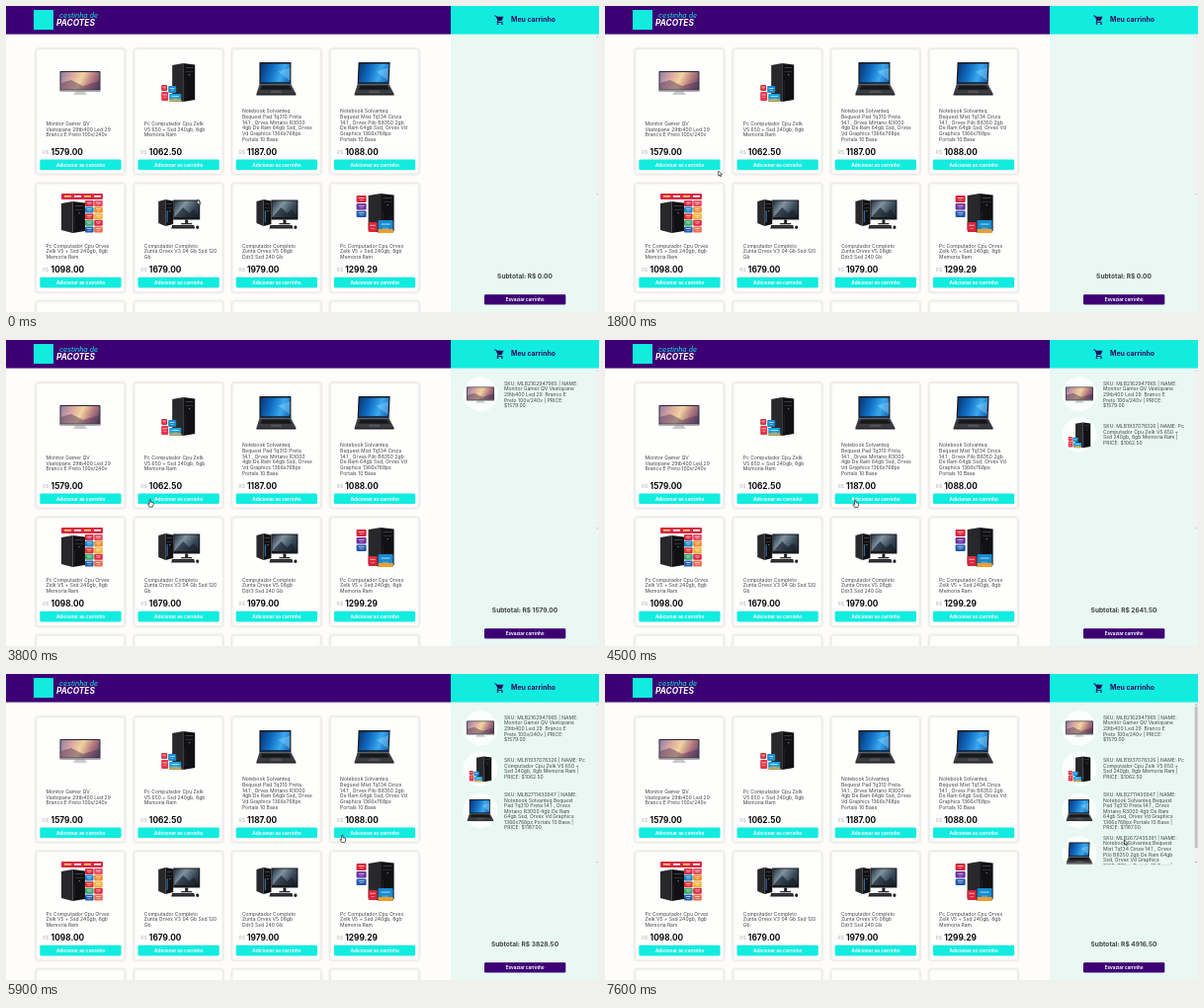
Recreate the animation shown at these times as an HTML page with a canvas. Size 600 by 310 pixels, loop 8000 ms.

```html
<!DOCTYPE html>
<html lang="pt-BR">
<head>
<meta charset="utf-8">
<title>Loja</title>
<style>
html, body { margin: 0; width: 100%; height: 100%; overflow: hidden; background: #fefdfc; }
canvas { display: block; width: 600px; height: 310px; }
</style>
</head>
<body>
<canvas id="stage"></canvas>
<script>
const W = 600, H = 310, LOOP = 8000, STEP = 100;
const PURPLE = '#3c0074', CYAN = '#12ecdf', MINT = '#e9f8f3', PAGE = '#fefdfb', INK = '#444446';
const canvas = document.getElementById('stage');
const ctx = canvas.getContext('2d');
const ratio = window.devicePixelRatio || 1;
canvas.width = W * ratio;
canvas.height = H * ratio;

function rect(x, y, w, h, fill) {
  ctx.fillStyle = fill;
  ctx.fillRect(x, y, w, h);
}

function round(x, y, w, h, r, fill, stroke) {
  ctx.beginPath();
  ctx.roundRect(x, y, w, h, r);
  ctx.fillStyle = fill;
  ctx.fill();
  if (stroke) {
    ctx.strokeStyle = stroke;
    ctx.lineWidth = 0.8;
    ctx.stroke();
  }
}

function poly(points, fill, stroke) {
  ctx.beginPath();
  points.forEach(([x, y]) => ctx.lineTo(x, y));
  ctx.closePath();
  ctx.fillStyle = fill;
  ctx.fill();
  if (stroke) {
    ctx.strokeStyle = stroke;
    ctx.lineWidth = 0.7;
    ctx.stroke();
  }
}

function disc(x, y, r, fill) {
  ctx.beginPath();
  ctx.arc(x, y, r, 0, Math.PI * 2);
  ctx.fillStyle = fill;
  ctx.fill();
}

// Set ten times larger, then scaled down, to keep small type free of rounding.
function text(str, x, y, size, color, weight = 400, align = 'left', style = 'normal') {
  ctx.save();
  ctx.translate(x, y);
  ctx.scale(0.1, 0.1);
  ctx.font = `${style} ${weight} ${size * 10}px Inter, "Open Sans", sans-serif`;
  ctx.textAlign = align;
  ctx.fillStyle = color;
  ctx.fillText(str, 0, 0);
  ctx.restore();
}

function lines(rows, x, y, pitch) {
  rows.forEach((row, i) => text(row, x, y + i * pitch, 5.05, INK));
}

function blend(x0, y0, x1, y1, colors) {
  const g = ctx.createLinearGradient(x0, y0, x1, y1);
  colors.forEach((c, i) => g.addColorStop(i / (colors.length - 1), c));
  return g;
}

// Product pictures, each around its own centre.
function monitor() {
  poly([[-4, 9], [4, 9], [7, 13], [-7, 13]], '#c9cacc');
  round(-20.5, -11, 41, 20.5, 0.8, '#2a2a30');
  rect(-19.5, -10, 39, 17.5, blend(-19, -10, 19, 8, ['#8d7fa8', '#d9a4a0', '#f0d3a0', '#b3757e', '#54456c']));
  poly([[-19.5, 7.5], [-19.5, 1], [-9, -2], [3, 4], [19.5, -1], [19.5, 7.5]], 'rgba(72,48,84,.45)');
  rect(-20, 8.4, 40, 1, '#d8d8da');
}

function tower(x, y, w, h) {
  poly([[x, y + 2], [x + w * 0.48, y], [x + w * 0.48, y + h], [x, y + h - 3]], '#28282b');
  poly([[x + w * 0.48, y], [x + w, y + 1.5], [x + w, y + h - 2], [x + w * 0.48, y + h]], '#111114');
  rect(x + w * 0.58, y + 4, w * 0.34, 1, '#3e3e43');
  rect(x + w * 0.58, y + 8, w * 0.34, 0.8, '#36363b');
  rect(x + w * 0.73, y + 11, 1.2, 1.2, '#777');
  rect(x + w * 0.55, y + h * 0.45, 0.5, h * 0.45, '#333338');
}

function badge(x, y, w, h, fill) {
  round(x, y, w, h, 1, fill);
  rect(x + w * 0.2, y + h * 0.28, w * 0.6, 0.8, 'rgba(255,255,255,.85)');
  rect(x + w * 0.3, y + h * 0.6, w * 0.4, 0.6, 'rgba(255,255,255,.65)');
}

function towerLow() {
  tower(-6, -19, 23, 39);
  badge(-17, 3, 6, 6, '#cf2f3c');
  badge(-17, 10, 7, 9, '#e5364a');
  badge(-10, 4, 8, 7, '#1689cf');
  badge(-9, 12, 12, 8, '#17a0dc');
  rect(-9, 17.5, 12, 2, '#f2a32e');
}

function laptop(tilt) {
  poly([[-17 + tilt, -17.5], [15 + tilt, -17.5], [15, 5], [-17, 5]], '#17181b');
  poly([[-15.7 + tilt, -16], [13.8 + tilt, -16], [13.8, 3.8], [-15.7, 3.8]],
    blend(-15, -10, 15, 0, ['#0a3f86', '#126fc4', '#3aa9ee', '#1161b4']));
  poly([[2, -8], [14, -12], [14, 1]], 'rgba(170,225,255,.35)');
  rect(-15.5, 2.6, 29, 1.2, '#102a4c');
  poly([[-17, 5], [15, 5], [20, 14.5], [-20, 14.5]], '#3a3b3f');
  poly([[-14, 6.2], [13, 6.2], [15.5, 10.2], [-16, 10.2]], '#17181b');
  poly([[-5, 11], [5, 11], [6, 13.7], [-6, 13.7]], '#505157');
  rect(-20, 14.5, 40, 1.5, '#222327');
}

function towerPromo() {
  tower(-19, -12, 24, 32);
  round(-19, -20, 42, 6, 1, '#d92843');
  for (let i = 0; i < 4; i++) rect(-16 + i * 10, -18, 7, 1.6, i % 2 ? '#fff' : '#ffd36a');
  const tints = ['#d92843', '#e24b5d', '#1686c9', '#ef8b2d', '#e32f2f', '#f0b43c', '#38a56b', '#d92843', '#235dac', '#ee6b4d'];
  tints.forEach((c, i) => badge(5 + (i % 2) * 9.2, -13 + Math.floor(i / 2) * 6.6, 8.6, 6, c));
}

function desktop() {
  tower(-20, -14, 15, 27);
  rect(-11.5, -3, 1, 12, '#2a74b8');
  rect(-5, -13.5, 27, 20, '#17181c');
  rect(-4, -12.5, 25, 16.5, blend(-4, -12, 21, 5, ['#26323e', '#8093a1', '#3b4a58', '#15202c']));
  poly([[-4, 4], [5, -6], [11, 0], [16, -4], [21, 4]], 'rgba(20,30,40,.65)');
  rect(7, 6.5, 3, 4, '#222');
  rect(3, 10, 11, 1.3, '#292a2d');
  poly([[-6, 12], [16, 12], [17, 15.5], [-7, 15.5]], '#222327');
  rect(-5, 13.2, 20, 0.6, '#505157');
  round(18, 12.5, 3, 3.5, 1.4, '#202124');
}

function towerSide() {
  tower(-6, -20, 26, 40);
  badge(-18, -18, 10, 7, '#d9253a');
  badge(-18, -10, 10, 6.5, '#6a2f9c');
  badge(-18, -2.5, 10, 6.5, '#2258ae');
  badge(4, 7, 15, 13, '#168bd0');
  rect(4, 16, 15, 4, '#ef9d2d');
  badge(-6, 9, 9, 10, '#d9253a');
}

const products = [
  { art: monitor, price: 1579, rows: ['Monitor Gamer QV', 'Vastopane 29tb400 Led 29', 'Branco E Preto 100v/240v'] },
  { art: towerLow, price: 1062.5, rows: ['Pc Computador Cpu Zelk', 'V5 650 + Ssd 240gb, 8gb', 'Memoria Ram'] },
  { art: () => laptop(0), price: 1187, rows: ['Notebook Solvanteq', 'Bequest Pad Tq310 Preta', '14.1 , Orvex Mirtano R3000', '4gb De Ram 64gb Ssd, Orvex', 'Vd Graphics 1366x768px', 'Portals 10 Base'] },
  { art: () => laptop(1), price: 1088, rows: ['Notebook Solvanteq', 'Bequest Mist Tq134 Cinza', '14.1 , Orvex Pilo B8350 2gb', 'De Ram 64gb Ssd, Orvex Vd', 'Graphics 1366x768px', 'Portals 10 Base'] },
  { art: towerPromo, price: 1098, rows: ['Pc Computador Cpu Orvex', 'Zelk V5 + Ssd 240gb, 8gb', 'Memoria Ram'] },
  { art: desktop, price: 1679, rows: ['Computador Completo', 'Zunta Orvex V3 04 Gb Ssd 120', 'Gb'] },
  { art: desktop, price: 1979, rows: ['Computador Completo', 'Zunta Orvex V5 08gb', 'Ddr3 Ssd 240 Gb'] },
  { art: towerSide, price: 1299.29, rows: ['Pc Computador Cpu Orvex', 'Zelk V5 + Ssd 240gb, 8gb', 'Memoria Ram'] }
];

const cart = [
  { at: 3000, y: 55, top: 45.8, rows: ['SKU: MLB2162947965 | NAME:', 'Monitor Gamer QV Vastopane', '29tb400 Led 29  Branco E', 'Preto 100v/240v | PRICE:', '$1579.00'] },
  { at: 3900, y: 96, top: 89, rows: ['SKU: MLB1937078326 | NAME: Pc', 'Computador Cpu Zelk V5 650 +', 'Ssd 240gb, 8gb Memoria Ram |', 'PRICE: $1062.50'] },
  { at: 5200, y: 138.5, top: 124, rows: ['SKU: MLB2711430947 | NAME:', 'Notebook Solvanteq Bequest', 'Pad Tq310 Preta 14.1 , Orvex', 'Mirtano R3000 4gb De Ram', '64gb Ssd, Orvex Vd Graphics', '1366x768px Portals 10 Base |', 'PRICE: $1187.00'] },
  { at: 6500, y: 182, top: 167.8, rows: ['SKU: MLB2672435391 | NAME:', 'Notebook Solvanteq Bequest', 'Mist Tq134 Cinza 14.1 , Orvex', 'Pilo B8350 2gb De Ram 64gb', 'Ssd, Orvex Vd Graphics', '1366x768px Portals 10 Base |', 'PRICE: $1088.00'] }
];

// Pointer tip: time, x, y
const path = [
  [0, 193.5, 196], [1000, 193.5, 196], [1900, 112, 166], [2100, 111, 164],
  [3000, 111, 164], [3400, 146, 161.5], [4000, 146, 161.5], [4600, 262, 162],
  [5400, 262, 162], [5900, 340.5, 163], [7000, 340.5, 163], [7600, 525.5, 168]
];

const cardX = col => 30.3 + col * 99.2;

function pointerAt(t) {
  const next = path.findIndex(k => k[0] > t);
  if (next < 0) return path[path.length - 1].slice(1);
  const [t0, x0, y0] = path[next - 1], [t1, x1, y1] = path[next];
  const u = (t - t0) / (t1 - t0), e = u * u * (3 - 2 * u);
  return [x0 + (x1 - x0) * e, y0 + (y1 - y0) * e];
}

function drawArt(art, x, y, scale = 1) {
  ctx.save();
  ctx.translate(x, y);
  ctx.scale(scale, scale);
  art();
  ctx.restore();
}

function cardBox(x, y, h) {
  ctx.save();
  ctx.shadowColor = 'rgba(0,0,0,.13)';
  ctx.shadowBlur = 2.5 * ratio;
  round(x, y, 90, h, 2, '#fefefd', '#ebebea');
  ctx.restore();
}

function drawCard({ art, price, rows }, i) {
  const x = cardX(i % 4), lower = i > 3;
  const y = lower ? 179.7 : 43.3, foot = lower ? 274.8 : 155.5;
  cardBox(x, y, lower ? 110.3 : 127);
  drawArt(art, x + 44.7, lower ? 210 : rows.length > 3 ? 74.5 : 77);
  lines(rows, x + 10.2, (lower ? 256 : rows.length > 3 ? 136.6 : 132.4) - (rows.length - 1) * 5.65, 5.65);
  if (rows.length < 3) return;
  text('R$', x + 6.7, foot - 5.6, 5.2, '#aaaaad', 300);
  text(price.toFixed(2), x + 15.3, foot - 4.6, 8.3, '#0b0b0d', 700);
  round(x + 4, foot, 82.3, 10.6, 1.4, CYAN);
  text('Adicionar ao carrinho', x + 45.3, foot + 7, 4.7, '#fff', 700, 'center');
}

function drawHeader() {
  rect(0, 0, 450, 28.6, PURPLE);
  rect(450, 0, 150, 28.6, CYAN);
  rect(28, 4, 20, 20, CYAN);
  text('cestinha de', 54, 12, 7.1, CYAN, 400, 'left', 'italic');
  text('PACOTES', 51, 19.6, 8.3, '#fff', 700, 'left', 'italic');

  const ink = '#2b0a5c';
  ctx.strokeStyle = ink;
  ctx.lineWidth = 1;
  ctx.beginPath();
  [[494.2, 10], [496, 10], [498, 14.7], [497, 16.4], [502.5, 16.4]].forEach(p => ctx.lineTo(...p));
  ctx.stroke();
  poly([[496, 10.7], [503.5, 10.7], [501.6, 14.9], [497.8, 14.9]], ink);
  disc(497.5, 18.1, 0.95, ink);
  disc(502, 18.1, 0.95, ink);
  text('Meu carrinho', 511, 16.4, 6.9, ink, 700);
}

function drawPanel(t) {
  rect(450, 28.6, 150, H - 28.6, MINT);
  const added = cart.filter(item => t >= item.at);
  const full = added.length === cart.length;

  ctx.save();
  ctx.beginPath();
  ctx.rect(450, 28.6, 150, 164.6);
  ctx.clip();
  added.forEach((item, i) => {
    disc(480, item.y, 17.5, '#fcfefd');
    drawArt(products[i].art, 480, item.y, i ? 0.66 : 0.68);
    lines(item.rows, 504, item.top, 5.58);
  });
  rect(596.3, 28.6, 3.7, 164.6, '#f1f3f2');
  if (full) rect(596.7, 33, 2.9, 143, '#bfc2c1');
  const mark = full ? '#727574' : '#b5b8b7';
  poly([[597.2, 31.7], [599.2, 31.7], [598.2, 30.4]], mark);
  poly([[597.2, 190], [599.2, 190], [598.2, 191.3]], mark);
  ctx.restore();

  const total = added.reduce((sum, item, i) => sum + products[i].price, 0);
  text('Subtotal: R$ ' + total.toFixed(2), 525, 276.3, 6.55, '#3f4244', 700, 'center');
  round(484, 292.3, 82.3, 10.3, 1.3, PURPLE);
  text('Esvaziar carrinho', 525.2, 299, 4.55, '#fff', 700, 'center');
}

function drawPointer([x, y]) {
  const hover = y > 155.5 && y < 166 && [0, 1, 2, 3].some(c => x > cardX(c) + 4 && x < cardX(c) + 86.3);
  ctx.save();
  ctx.translate(x, y);
  ctx.lineJoin = 'round';
  if (hover) {
    poly([[-0.8, 0.3], [0.4, 0.3], [0.5, 2.8], [2.8, 3.2], [3.3, 4], [2.9, 6.2], [2.3, 7.6], [-0.9, 7.6], [-2.6, 4.9], [-2, 4.2], [-0.9, 5]], '#fff', '#222');
  } else {
    poly([[0, 0], [0, 5.2], [1.2, 4.1], [2, 5.8], [2.8, 5.4], [2, 3.8], [3.6, 3.7]], '#fff', '#222');
  }
  ctx.restore();
}

function draw(t) {
  ctx.setTransform(ratio, 0, 0, ratio, 0, 0);
  rect(0, 0, W, H, PAGE);
  for (let col = 0; col < 4; col++) cardBox(cardX(col), 299, 30);
  products.forEach(drawCard);
  drawPanel(t);
  drawHeader();
  drawPointer(pointerAt(t));
}

const start = performance.now();
function tick() {
  const t = (performance.now() - start) % LOOP;
  draw(Math.floor(t / STEP) * STEP);
  requestAnimationFrame(tick);
}
tick();
</script>
</body>
</html>
```
